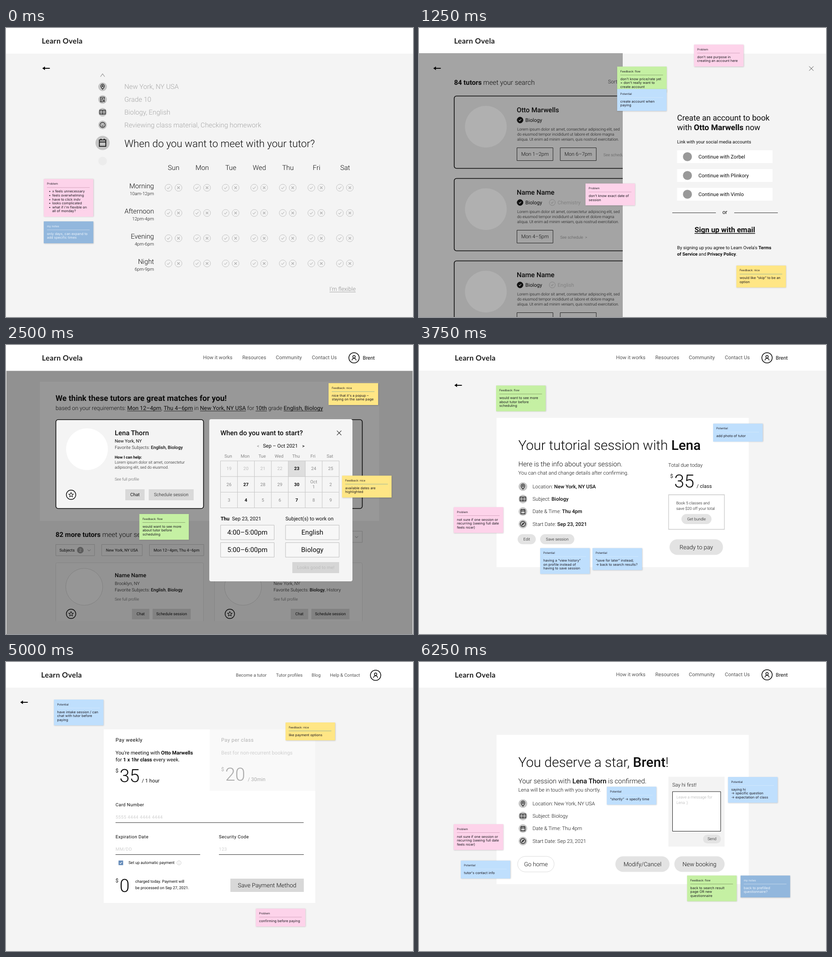
These frames come from a looping animation (887 by 631 pixels, 7.5 s). An HTML page with a canvas:

```html
<!DOCTYPE html>
<html lang="en">
<head>
<meta charset="utf-8">
<title>Tutoring wireframes</title>
<style>
html, body { margin: 0; width: 100%; height: 100%; overflow: hidden; background: #f4f4f4; }
canvas { display: block; width: 887px; height: 631px; }
</style>
</head>
<body>
<canvas id="stage"></canvas>
<script>
const W = 887, H = 631, HOLD = 1250, K = 0.616;
const BRAND = 'Learn Ovela', TUTOR = 'Otto Marwells', MATCH = 'Lena Thorn', FIRST = 'Lena', USER = 'Brent';
const BG = '#f4f4f4', INK = '#0c0c0c';
const canvas = document.getElementById('stage'), c = canvas.getContext('2d');
const ratio = window.devicePixelRatio || 1;
canvas.width = W * ratio;
canvas.height = H * ratio;
c.textRendering = 'geometricPrecision'; // fractional letter advances at small sizes

const LOREM = [
  'Lorem ipsum dolor sit amet, consectetur adipiscing elit, sed',
  'do eiusmod tempor incididunt ut labore et dolore magna',
  'aliqua. Ut enim ad minim veniam, quis nostrud exercitation.'
];
const NOTE = {
  pink: ['#fdd3ea', '#d3a3bd'], green: ['#c5f0a3', '#86a06a'], blue: ['#bfdffd', '#d3e8fc'],
  yellow: ['#ffe685', '#8fb39a'], own: ['#92b7dd', '#c9dbee']
};
const ring = (x, y, r) => `M${x + r} ${y}a${r} ${r} 0 1 1 ${-2 * r} 0a${r} ${r} 0 1 1 ${2 * r} 0`;
const ICON = {
  pin: 'M12 22C8 17 5 13 5 9a7 7 0 0 1 14 0c0 4-3 8-7 13z' + ring(12, 9, 2.3),
  doc: 'M19 11V3H4v18h8M8 8h7M8 12h4M8 16h3' + ring(17, 15.5, 2) + 'M13 22q4-6 8 0',
  book: 'M1 4h9l2 2 2-2h9v15h-9l-2 1-2-1H1zM12 6v14M5 9h3M5 14h3M16 9h3M16 14h3',
  smile: ring(12, 12, 10) + 'M7.5 9.5h2M14.5 9.5h2M8 15q4 3 8 0',
  calendar: 'M4 5h16v16H4zM4 10h16M8 2v3M16 2v3',
  compass: ring(12, 12, 10) + 'M16 8l-2.5 5.5L8 16l2.5-5.5z',
  star: 'M12 3l2.7 5.8 6.3.8-4.6 4.4 1.2 6.2L12 17.2 6.4 20.2l1.2-6.2L3 9.6l6.3-.8z',
  check: 'M6 12.5l4 4 8-9',
  cross: 'M7 7l10 10M17 7L7 17',
  up: 'M4 18L12 7l8 11',
  down: 'M5 9l7 7 7-7',
  user: ring(12, 8.5, 4) + 'M5 20.5q1.5-7 7-7t7 7'
};

function rect(x, y, w, h, fill, stroke, r = 0, lw = 1) {
  c.beginPath();
  c.roundRect(x, y, w, h, r);
  if (fill) { c.fillStyle = fill; c.fill(); }
  if (stroke) { c.strokeStyle = stroke; c.lineWidth = lw; c.stroke(); }
}
function disc(x, y, r, fill, stroke, lw = 1) {
  rect(x - r, y - r, 2 * r, 2 * r, fill, stroke, r, lw);
}
function line(x1, y1, x2, y2, color, lw = 1) {
  c.beginPath();
  c.moveTo(x1, y1);
  c.lineTo(x2, y2);
  c.strokeStyle = color;
  c.lineWidth = lw;
  c.stroke();
}
function icon(name, x, y, size, color = INK, lw = 2) {
  c.save();
  c.translate(x - size / 2, y - size / 2);
  c.scale(size / 24, size / 24);
  c.strokeStyle = color;
  c.lineWidth = lw;
  c.stroke(new Path2D(ICON[name]));
  c.restore();
}

// y is the middle of the capitals; size is in layout units
function text(str, x, y, size, weight = 400, color = INK, align = 'left', gap = 0) {
  c.font = `${weight} ${size * K}px Roboto, sans-serif`;
  c.letterSpacing = gap + 'px';
  c.textAlign = align;
  c.fillStyle = color;
  c.fillText(str, x, y + size * K * 0.335);
  const w = c.measureText(str).width;
  c.letterSpacing = '0px';
  return w;
}
const mid = (str, x, y, size, weight, color) => text(str, x, y, size, weight, color, 'center');

// parts between asterisks are emphasised
function rich(str, x, y, size, weight = 400, strong = 500, color = INK, under = false) {
  str.split('*').forEach((part, i) => {
    const w = text(part, x, y, size, i % 2 ? strong : weight, color);
    if (under && i % 2) line(x, y + size * K * 0.5, x + w, y + size * K * 0.5, color, 0.8);
    x += w;
  });
}
function button(str, x, y, w, h, size, weight, fill, stroke, r = 0, color = INK) {
  rect(x, y, w, h, fill, stroke, r);
  mid(str, x + w / 2, y + h / 2, size, weight, color);
}
const pill = (str, x, y, w, h, size, fill = '#e3e3e3', stroke) =>
  button(str, x, y, w, h, size, 300, fill, stroke, h / 2);

function note(kind, x, y, head, lines, indent = 0) {
  const [fill, rule] = NOTE[kind], ink = kind === 'own' ? '#eef5fc' : '#1d1b22';
  c.save();
  c.shadowColor = 'rgba(0,0,0,.2)';
  c.shadowBlur = 2.5 * ratio;
  c.shadowOffsetX = c.shadowOffsetY = 0.5 * ratio;
  rect(x, y, 108, 30.5 + 8.6 * lines.length, fill);
  c.restore();
  c.textAlign = 'left';
  c.fillStyle = ink;
  c.font = '400 6.1px Inter, sans-serif';
  c.fillText(head, x + 7, y + 12.6);
  line(x + 7, y + 18.5, x + 100, y + 18.5, rule, 0.9);
  c.fillStyle = ink;
  c.font = '400 7.5px Inter, sans-serif';
  lines.forEach((str, i) => {
    const base = y + 29.5 + 8.6 * i;
    if (str[0] === '•') c.fillText('•', x + 11, base);
    c.fillText(str.replace('•', ''), x + 7 + indent, base);
  });
}

function logo(x) {
  c.font = '700 16px Lato, sans-serif';
  c.letterSpacing = '0.35px';
  c.textAlign = 'left';
  c.fillStyle = '#1c1c1c';
  c.fillText(BRAND, x, 33.6);
  c.letterSpacing = '0px';
}
function page(logoX) {
  rect(0, 0, W, H, BG);
  rect(0, 0, W, 56, '#fff');
  logo(logoX);
}
function avatar(x, y) {
  disc(x, y, 11.3, null, INK, 1.5);
  icon('user', x, y, 16, INK, 2);
}
function memberNav() {
  const items = { 'How it works': 429.5, Resources: 515, Community: 588, 'Contact Us': 666.5 };
  for (const [label, x] of Object.entries(items)) text(label, x, 27.5, 18, 400, '#555');
  avatar(758.5, 28);
  text(USER, 777.5, 28, 18);
}
function back(x) {
  line(x + 4, 88, x + 16.5, 88, INK, 2);
  c.beginPath();
  c.moveTo(x, 88);
  c.lineTo(x + 6, 84);
  c.lineTo(x + 6, 92);
  c.fillStyle = INK;
  c.fill();
}
function badge(name, x, y) {
  disc(x, y, 9.4, '#c4c4c4');
  icon(name, x, y, 13.5);
}

function questionnaire() {
  page(78);
  back(79);
  icon('up', 210.5, 103, 14, '#999', 2);
  [['pin', 'New York, NY USA'], ['doc', 'Grade 10'], ['book', 'Biology, English'],
    ['smile', 'Reviewing class material, Checking homework']].forEach(([name, str], i) => {
    const y = 128.3 + 27.8 * i;
    badge(name, 210.5, y);
    text(str, 258, y, 24, 300, '#a6a6a6');
  });
  disc(210.5, 251, 15.5, '#c4c4c4');
  icon('calendar', 210.5, 250.5, 21, INK, 2);
  disc(210.5, 290.5, 9.4, '#ececec');
  text('When do you want to meet with your tutor?', 258, 252.5, 36, 300);

  ['Sun', 'Mon', 'Tue', 'Wed', 'Thu', 'Fri', 'Sat'].forEach((d, i) => mid(d, 365.3 + 62.3 * i, 305.5, 24, 300));
  [['Morning', '10am-12pm'], ['Afternoon', '12pm-4pm'], ['Evening', '4pm-6pm'], ['Night', '6pm-9pm']].forEach(([part, hours], r) => {
    const y = 348.8 + 55.1 * r;
    text(part, 322.5, y - 3.8, 24, 300, INK, 'right');
    text(hours, 322.5, y + 13, 16, 300, INK, 'right');
    for (let i = 0; i < 7; i++) {
      const x = 354.2 + 62.25 * i;
      disc(x, y, 7.6, null, '#c2c2c2');
      icon('check', x, y, 13, '#bbb', 2);
      disc(x + 21.7, y, 7.6, null, '#c2c2c2');
      icon('cross', x + 21.7, y, 13, '#b3b3b3', 2.6);
    }
  });
  text("I'm flexible", 762, 570, 20, 300, '#8c8c8c', 'right');
  line(705, 576.5, 762, 576.5, '#999', 0.8);
  note('pink', 82.3, 329.8, 'Problem', ['•x feels unnecessary', '•feels overwhelming', '•have to click indv',
    '•looks complicated', "•what if i'm flexible on", 'all of monday?'], 11.5);
  note('own', 82.3, 422.3, 'my notes', ['only days, can expand to', 'add specific times']);
}

function subject(x, y, str, on) {
  disc(x, y, 6.5, on ? '#111' : null, on ? '#111' : '#838383');
  icon('check', x, y, 10, on ? '#bbb' : '#838383', 2.5);
  text(str, x + 11.5, y, 18, 400, on ? INK : '#838383');
}
function result(y, name, second, times) {
  rect(76.7, y, 500, 158, null, INK, 5, 1.6);
  disc(145.7, y + 67, 45.5, '#b0b0b0');
  text(name, 213, y + 31, 24, 500);
  subject(220.3, y + 52.5, 'Biology', true);
  if (second) subject(290.5, y + 52.5, second, false);
  LOREM.forEach((str, i) => text(str, 214, y + 72.5 + 11.1 * i, 14, 300));
  times.forEach((str, i) => button(str, 213.5 + 94.3 * i, y + 113, 78.5, 28, 18, 300, null, '#222'));
  text('See schedule  >', 213.5 + 94.3 * times.length, y + 128.5, 14, 300, '#555');
}
function signUp() {
  page(76.5);
  rect(0, 55, 444, H, '#a4a4a4');
  back(31);
  rich('*84 tutors* meet your search', 76.5, 119.5, 24, 300, 700);
  text('Sorted by', 412, 117, 18, 300, '#222');
  result(148.5, TUTOR, '', ['Mon 1–2pm', 'Mon 6–7pm']);
  result(328.5, 'Name Name', 'Chemistry', ['Mon 4–5pm']);
  result(508.5, 'Name Name', 'English', ['Mon 4–5pm', 'Mon 6–7pm']);

  rect(444, 56, 443, 575, BG);
  icon('cross', 855, 88.5, 23, '#333', 0.9);
  text('Create an account to book', 562.5, 196.5, 28);
  rich(`with *${TUTOR}* now`, 562.5, 217, 28, 400, 700);
  text('Link with your social media accounts', 562.5, 248.7, 16);
  ['Zorbel', 'Plinkory', 'Vimlo'].forEach((site, i) => {
    const y = 281 + 41 * i;
    rect(562.5, y - 14, 208, 28, '#fff');
    disc(585, y, 9.8, '#999');
    text('Continue with ' + site, 609, y, 18);
  });
  line(552, 403.5, 647, 403.5, '#333');
  line(687, 403.5, 782, 403.5, '#333');
  mid('or', 666.5, 402, 19);
  mid('Sign up with email', 666.5, 440.5, 26, 700);
  line(600.5, 448.5, 732.5, 448.5, INK, 1.3);
  rich(`By signing up you agree to ${BRAND}'s *Terms*`, 562.5, 479.8, 16, 400, 700);
  rich('*of Service* and *Privacy Policy*.', 562.5, 493.3, 16, 400, 700);

  note('pink', 599.3, 36.3, 'Problem', ["don't see purpose in", 'creating an account here']);
  note('green', 431.8, 84.2, 'Feedback: flow', ["don't know price/rate yet", "= don't really want to", 'create account']);
  note('blue', 431.8, 133.3, 'Potential', ['create account when', 'paying']);
  note('pink', 362.8, 339.5, 'Problem', ["don't know exact date of", 'session']);
  note('yellow', 691.7, 518.8, 'Feedback: nice', ['would like “skip” to be an', 'option']);
}

function starButton(x, y) {
  disc(x, y, 10.3, null, INK, 1.4);
  icon('star', x, y, 13, INK, 2);
}
function dimCard(x, city, subjects, name) {
  rect(x + 0.5, 475.5, 322, 129, '#939393', '#858585', 3);
  rect(x - 2, 603, 328, 3, '#919191');
  disc(x + 62.5, 528, 40.3, '#969696', '#7d7d7d', 0.8);
  if (name) text(name, x + 129, 503, 20, 500);
  text(city, x + 129, 521, 16, 300);
  rich('Favorite Subjects: ' + subjects, x + 129, 535, 16, 300, 500);
  text('See full profile', x + 129, 555.3, 14, 300, '#333');
  starButton(x + 33.8, 587);
  button('Chat', x + 166.5, 576, 38, 23, 14, 400, '#828282');
  button('Schedule session', x + 211.5, 576, 83, 23, 14, 400, '#828282');
}
function calendar() {
  const x0 = 467.5, y0 = 253, cw = 36.93, ch = 34.2, grid = '#c6c6c6';
  mid('Sep – Oct 2021', 598, 220.5, 18, 400);
  mid('<', 549.5, 221, 16, 400, '#888');
  mid('>', 648, 221, 16, 500);
  ['Sun', 'Mon', 'Tue', 'Wed', 'Thu', 'Fri', 'Sat'].forEach((d, i) => mid(d, 484.3 + cw * i, 242.7, 16, 400, '#888'));
  rect(x0 + 4 * cw, y0, cw, ch, '#dedede');
  const open = [23, 27, 30, 34, 37];
  for (let i = 0; i < 21; i++) {
    const n = 19 + i, x = x0 + cw * (i % 7 + 0.5), y = y0 + ch * (Math.floor(i / 7) + 0.5);
    const free = open.includes(n), color = free ? INK : n < 23 ? '#bdbdbd' : '#8a8a8a';
    if (n === 31) mid('Oct', x, y - 5.5, 16, 400, color);
    mid(n > 30 ? n - 30 : n, x, y + (n === 31 ? 5.5 : 0), 16, free ? 700 : 400, color);
  }
  for (let i = 0; i < 8; i++) line(x0 + cw * i, y0, x0 + cw * i, y0 + 3 * ch, grid);
  for (let i = 0; i < 4; i++) line(x0, y0 + ch * i, x0 + 7 * cw, y0 + ch * i, grid);
}
function matches() {
  page(78.3);
  memberNav();
  rect(1, 56.5, 885, H, '#919191');
  rect(74, 80, 739, 304, '#989898');
  text('We think these tutors are great matches for you!', 108, 116, 28, 700);
  rich('based on your requirements: *Mon 12–4pm*, *Thu 4–6pm* in *New York, NY USA* for *10th* grade *English, Biology*',
    108, 138, 20, 300, 400, INK, true);

  rect(454.5, 163, 322, 194, '#939393', INK, 5, 1.6);
  rect(108.7, 163, 321.8, 194, BG, INK, 5, 1.6);
  disc(176.5, 227.5, 45.5, '#fff');
  text(MATCH, 237, 192.3, 24, 500);
  text('New York, NY', 237, 210, 16);
  rich('Favorite Subjects: *English, Biology*', 237, 223.6, 16, 300, 500);
  text('How I can help:', 237, 245.3, 14, 700);
  text('Lorem ipsum dolor sit amet, consectetur', 237, 256.5, 14, 300);
  text('adipiscing elit, sed do eiusmod.', 237, 267.3, 14, 300);
  text('See full profile', 237, 293.3, 14, 300, '#555');
  starButton(141.8, 327);
  button('Chat', 260, 315, 42, 24, 16, 400, '#d9d9d9');
  button('Schedule session', 311, 315, 98, 24, 16, 300, '#d9d9d9');

  rich('*82 more tutors* meet your search', 108, 413.8, 24, 300, 700);
  rect(108.5, 435.5, 84.5, 24.5, null, '#777');
  text('Subjects', 116.5, 448, 14);
  disc(162, 448, 7.2, '#5c5c5c');
  mid('2', 162, 448, 14, 400, '#999');
  icon('down', 181, 448, 11, '#444', 1.8);
  button('New York, NY USA', 208.5, 435.5, 88.5, 24.5, 14, 400, null, '#777');
  button('Mon 12–4pm, Thu 4–6pm', 312.5, 435.5, 118.5, 24.5, 14, 400, null, '#777');
  rect(690, 406.5, 86.5, 24.5, null, '#777');
  icon('down', 764, 419, 11, '#444', 1.8);
  dimCard(108, 'Brooklyn, NY', '*English*, *Biology*', 'Name Name');
  dimCard(454, 'New York, NY', '*Biology*, History');

  rect(443, 162, 312, 354, '#f5f5f5', null, 4);
  text('When do you want to start?', 467.3, 192, 24, 500);
  icon('cross', 726, 192, 23, '#222', 1.1);
  calendar();
  text('Thu', 467.7, 379.3, 18, 700);
  text('Sep 23, 2021', 492.5, 379.3, 18);
  text('Subject(s) to work on', 609, 379.3, 18);
  [['4:00–5:00pm', 'English'], ['5:00–6:00pm', 'Biology']].forEach((row, r) =>
    row.forEach((str, i) => button(str, 467.7 + 141.5 * i, 393.3 + 38.2 * r, 116.8, 31.7, 24, 400, '#f7f7f7', '#bebebe')));
  button('Looks good to me!', 624, 474, 102, 24, 16, 400, '#d6d6d6', null, 0, '#bcbcbc');

  note('yellow', 703, 83.3, 'Feedback: nice', ["nice that it's a popup –", 'staying on the same page']);
  note('yellow', 732.3, 285.3, 'Feedback: nice', ['available dates are', 'highlighted']);
  note('green', 290.5, 369, 'Feedback: flow', ['would want to see more', 'about tutor before', 'scheduling']);
}

function details(strong) {
  [['pin', 'Location: *New York, NY USA*'], ['book', 'Subject: *Biology*'],
    ['calendar', 'Date & Time: *Thu 4pm*'], ['compass', 'Start Date: *Sep 23, 2021*']].forEach(([name, str], i) => {
    const y = 309.2 + 27.2 * i;
    badge(name, 226.5, y);
    rich(str, 247.5, y, 18, 300, strong);
  });
}
function price(x, y, amount, unit, unitX, color = INK) {
  text('$', x, y - 12, 18, 400, color);
  text(amount, x + 8.7, y, 64, 300, color);
  if (unit) text('/ ' + unit, unitX, y + 10, 18, 400, color);
}
function recurringNote() {
  note('pink', 75.7, 354, 'Problem', ['not sure if one session or', 'recurring (seeing full date', 'feels nicer)']);
}
function confirm() {
  page(78);
  memberNav();
  back(77);
  rect(169, 159, 549.5, 326, '#fff');
  rich(`Your tutorial session with *${FIRST}*`, 216.5, 219, 48, 300, 500);
  text('Here is the info about your session.', 216.5, 260.5, 24, 300);
  text('You can chat and change details after confirming.', 216.5, 279, 18, 300);
  details(500);
  pill('Edit', 215, 413, 39.5, 22, 14);
  pill('Save session', 264, 413, 74.5, 22, 14);
  text('Total due today', 543.3, 262, 18, 300);
  price(547.5, 298, '35', 'class', 605);
  rect(544, 327, 121.5, 75.5, '#fff', '#c9c9c9', 0, 1.3);
  text('Book 5 classes and', 560.7, 345.3, 14, 300);
  text('save $20 off your total', 560.7, 357.3, 14, 300);
  pill('Get bundle', 572, 369, 65.5, 22, 14);
  pill('Ready to pay', 546, 424.3, 116.5, 34, 21);

  note('green', 168, 88.5, 'Feedback: flow', ['would want to see more', 'about tutor before', 'scheduling']);
  note('blue', 641, 171.8, 'Potential', ['add photo of tutor']);
  recurringNote();
  note('blue', 264, 443.5, 'Potential', ['having a “view history”', 'on profile instead of', 'having to save session']);
  note('blue', 378, 443.5, 'Potential', ['“save for later” instead;', '→ back to search results?']);
}

function field(label, hint, x, y, w) {
  text(label, x, y, 16, 400, INK, 'left', 0.37);
  text(hint, x, y + 26.6, 16, 400, '#d0d0d0', 'left', 0.37);
  line(x, y + 38.8, x + w, y + 38.8, '#333');
}
function payment() {
  page(76.5);
  const items = { 'Become a tutor': 501, 'Tutor profiles': 588.5, Blog: 666, 'Help & Contact': 706 };
  for (const [label, x] of Object.entries(items)) text(label, x, 28.5, 16, 400, '#555');
  avatar(805.5, 29);
  back(31);
  rect(213, 147, 461, 379, '#fff');
  rect(444, 147, 230, 134.5, '#f9f9f9');
  text('Pay weekly', 238.7, 170, 18, 400, INK, 'left', 0.43);
  rich(`You're meeting with *${TUTOR}*`, 238.7, 198.3, 18, 400, 700);
  rich('for *1 x 1hr class* every week.', 238.7, 213, 18, 400, 700);
  price(238.7, 249, '35', '1 hour', 296);
  text('Pay per class', 469, 170, 18, 400, '#b0b0b0', 'left', 0.43);
  text('Best for non-recurrent bookings', 469, 198.3, 18, 400, '#cfcfcf');
  price(469, 245.8, '20', '30min', 527, '#adadad');

  field('Card Number', '5555 4444 4444 4444', 238.7, 311.9, 410);
  field('Expiration Date', 'MM/DD', 238.7, 381.7, 184.5);
  field('Security Code', '123', 464, 381.7, 185);
  rect(245.3, 433.5, 10, 10, '#6289b8');
  icon('check', 250.3, 438.5, 10, '#fff', 2.6);
  text('Set up automatic payment', 267, 438.5, 14);
  disc(377, 438.5, 4.5, null, '#bbb', 0.8);
  line(377, 437.8, 377, 440.8, '#bbb', 0.9);
  line(377, 435.8, 377, 436.7, '#bbb', 0.9);
  price(238.7, 489, '0');
  text('charged today. Payment will', 281.7, 479, 14);
  text('be processed on Sep 27, 2021.', 281.7, 493.5, 14);
  button('Save Payment Method', 489, 473, 160, 29, 21, 300, '#d8d8d8');

  note('blue', 104.5, 82, 'Potential', ['have intake session / can', 'chat with tutor before', 'paying']);
  note('yellow', 609.2, 132, 'Feedback: nice', ['like payment options']);
  note('pink', 544.5, 538.5, 'Problem', ['confirming before paying']);
}

function confirmed() {
  page(78);
  memberNav();
  rect(169, 159, 549.5, 326, '#fff');
  rich(`You deserve a star, *${USER}*!`, 216.5, 219, 48, 300, 500);
  rich(`Your session with *${MATCH}* is confirmed.`, 216.5, 260.5, 24, 300, 500);
  text(FIRST + ' will be in touch with you shortly.', 216.5, 279, 18, 300);
  details(300);
  pill('Go home', 215, 424.3, 79.5, 34, 21, '#fff', '#dcdcdc');
  pill('Modify/Cancel', 428, 424.3, 118, 34, 21);
  pill('New booking', 556.5, 424.3, 109.5, 34, 21);
  rect(543.5, 250.5, 122.5, 152.5, '#f3f3f3');
  text('Say hi first!', 552, 268.5, 18, 300);
  rect(552.5, 283, 105, 86.5, '#fff', '#222');
  text('Leave a message for', 561, 295.5, 14, 300, '#ababab');
  text(FIRST + ' :)', 561, 307.5, 14, 300, '#ababab');
  pill('Send', 619, 377, 39, 19, 14);

  note('blue', 409.3, 272.3, 'Potential', ['“shortly” → specify time']);
  note('blue', 673.5, 251, 'Potential', ['saying hi', '→ specific question', '→ expectation of class']);
  recurringNote();
  note('blue', 91, 433.7, 'Potential', ["tutor's contact info"]);
  note('green', 584.3, 466.3, 'Feedback: flow', ['back to search result', 'page OR new', 'questionnaire']);
  note('own', 700.8, 466.3, 'my notes', ['back to prefilled', 'questionnaire?']);
}

const scenes = [questionnaire, signUp, matches, confirm, payment, confirmed];
const start = performance.now();
function tick() {
  const t = Math.max(0, performance.now() - start);
  c.setTransform(ratio, 0, 0, ratio, 0, 0);
  scenes[Math.floor(t / HOLD) % scenes.length]();
  requestAnimationFrame(tick);
}
tick();
</script>
</body>
</html>
```
